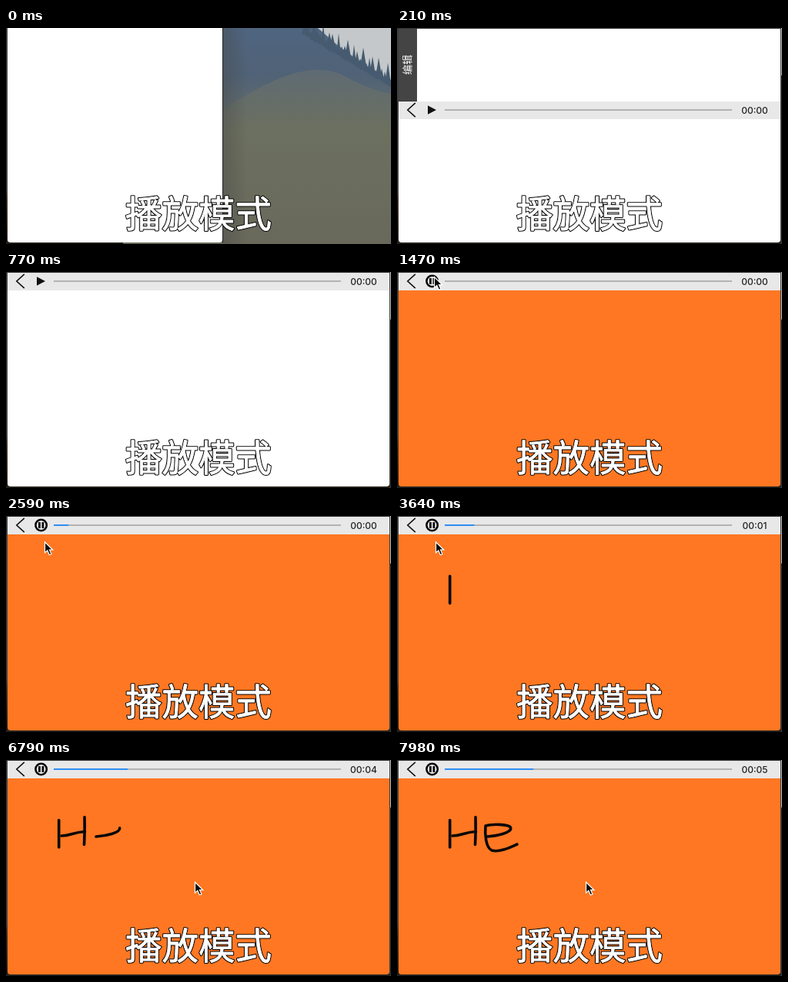
These frames come from a looping animation (500 by 282 pixels, 8 s). An HTML page:

```html
<!DOCTYPE html>
<html lang="zh">
<head>
<meta charset="utf-8">
<style>
  html, body { margin: 0; width: 100%; height: 100%; overflow: hidden; background: #292929; }
  svg { display: block; width: 100vw; height: 100vh; }
  .ink { fill: none; stroke: #080808; stroke-width: 3.6; stroke-linecap: round; stroke-linejoin: round; }
  .caption { font: 500 47.5px "Noto Sans CJK SC", "Noto Sans CJK", sans-serif; text-anchor: middle; stroke-linejoin: round; }
  .clock { font: 500 12px Inter, sans-serif; text-anchor: middle; fill: #222; }
  .tab { font: 13px "Noto Sans CJK SC", "Noto Sans CJK", sans-serif; text-anchor: middle; fill: #fff; }
</style>
</head>
<body>
<svg viewBox="0 0 500 282">
  <defs>
    <linearGradient id="hill" x2="0" y2="1">
      <stop offset="0" stop-color="#4f6580"/>
      <stop offset=".22" stop-color="#506276"/>
      <stop offset=".4" stop-color="#636d6d"/>
      <stop offset=".55" stop-color="#6c705f"/>
      <stop offset="1" stop-color="#69695b"/>
    </linearGradient>
    <linearGradient id="meadow" x2="0" y2="1">
      <stop offset="0" stop-color="#5e6b73"/>
      <stop offset=".35" stop-color="#6c705f"/>
      <stop offset="1" stop-color="#69695b"/>
    </linearGradient>
    <linearGradient id="shade">
      <stop offset="0" stop-color="#444" stop-opacity=".4"/>
      <stop offset="1" stop-color="#444" stop-opacity="0"/>
    </linearGradient>
    <linearGradient id="edge" x2="0" y2="1">
      <stop offset=".76" stop-color="#3c3c3c"/>
      <stop offset=".79" stop-color="#3b2a22"/>
      <stop offset="1" stop-color="#17130f"/>
    </linearGradient>
    <clipPath id="window"><rect id="mask" x="2" y="-10" height="290" rx="4"/></clipPath>
  </defs>

  <g id="photo">
    <rect width="500" height="282" fill="#c4c8ca"/>
    <path d="M0 0H405L430 22 460 44 480 57 500 70V282H0Z" fill="url(#hill)"/>
    <path id="trees" fill="#465b70"/>
    <path d="M280 108Q315 84 350 68Q405 44 440 63T500 86V282H280Z" fill="url(#meadow)"/>
    <g id="shadow">
      <rect width="32" height="282" fill="url(#shade)"/>
      <rect width="1" height="280" fill="#222"/>
    </g>
  </g>
  <rect width="2" height="282" fill="url(#edge)"/>
  <rect y="279" width="152" height="3" fill="#211d18"/>
  <g id="frame">
    <rect y="279" width="500" height="3" fill="#24211d"/>
    <rect x="498" width="2" height="282" fill="#303030"/>
    <rect x="499" width="1" height="62" fill="#c0c4c6"/>
  </g>

  <g clip-path="url(#window)">
    <rect id="page" width="500" height="282"/>
    <g class="ink" id="ink">
      <path d="M68.7 78.5V114"/>
      <path d="M72 99C84 99 88 94 102.5 93.5"/>
      <path d="M102 74.5Q102.5 94 101.5 110.5"/>
      <path d="M117 100C130 99 150 95 147.500 88C145 84 124 83 115 86C114 96 115 114 123 118C133 121 147 114 156 110"/>
    </g>
    <g id="panel">
      <rect x="2" y="-96" width="24" height="97" fill="#444"/>
      <text class="tab" transform="translate(18 -47) rotate(-90)">编辑</text>
      <rect y="1" width="500" height="23" fill="#e8e8e8"/>
      <path d="M23.800 2.800L13.800 12 23.800 21.200" fill="none" stroke="#111" stroke-width="1.6"/>
      <path id="play" d="M40 6.300L51 12 40 17.700Z" fill="#111"/>
      <g id="pause" fill="#080808">
        <circle cx="45.600" cy="12" r="7.200" fill="#f0f0f0" stroke="#080808" stroke-width="2.600"/>
        <path d="M42 8h2.800v8h-2.800zM46.500 8h2.800v8h-2.800z"/>
      </g>
      <path d="M62 12H435" stroke="#b2b2b2" stroke-width="2"/>
      <path id="progress" stroke="#2f8df5" stroke-width="2"/>
      <text class="clock" id="clock" x="464.500" y="16.500"></text>
    </g>
  </g>
  <path id="topline" d="M0 .5H499" stroke="#333"/>

  <g class="caption">
    <text x="250" y="259.500" fill="#000" stroke="#000" stroke-width="2.800">播放模式</text>
    <text x="250" y="259.500" fill="#fff" stroke="#fff" stroke-width=".8">播放模式</text>
  </g>
  <path id="cursor" d="M0 0V14L3.300 11 5.800 16.800 8.400 15.700 6 10.200H10.300Z" fill="#080808" stroke="#fff" stroke-width="1.200"/>
</svg>
<script>
const LOOP = 8000, STEP = 70, OPENED = 210, STARTED = 840;
const $ = id => document.getElementById(id);
const unit = (t, from, to) => Math.min(1, Math.max(0, (t - from) / (to - from)));
const smooth = u => (1 - Math.cos(Math.PI * u)) / 2;
const show = (id, on) => $(id).style.display = on ? '' : 'none';

// time, x, y
const cursorPath = [
  [840, 466, 262], [1400, 48.5, 6.5], [1750, 48.5, 6.5], [2380, 50.5, 34], [3640, 50.5, 34],
  [3920, 150, 126], [4200, 156, 132], [4340, 161, 136], [4760, 161, 136], [4970, 245.5, 159.5]
];
const strokeTimes = [[2870, 3500], [4690, 4970], [5670, 6020], [6440, 7840]];
const ticks = [1750, 2770, 3710, 4690, 5670, 6860];
const tickWidth = 19.2;

const strokes = [...$('ink').children];
strokes.forEach(path => path.setAttribute('pathLength', 1));

let trees = '';
for (let i = 0; i < 30; i++) {
  const x = 388 + i * 4, base = (x - 400) * .6 + 16;
  const height = 19 + 10 * Math.sin(i * 2.4), half = 4 + Math.sin(i * 5);
  trees += `M${x} ${base - height}l${half} ${height}h${-2 * half}Z`;
}
$('trees').setAttribute('d', trees);

function cursorAt(t) {
  const next = cursorPath.findIndex(point => point[0] > t);
  if (next < 0) return cursorPath.at(-1).slice(1);
  if (next === 0) return cursorPath[0].slice(1);
  const [a, b] = [cursorPath[next - 1], cursorPath[next]];
  const u = smooth(unit(t, a[0], b[0]));
  return [a[1] + (b[1] - a[1]) * u, a[2] + (b[2] - a[2]) * u];
}

function draw(t) {
  const width = 279 + 217 * smooth(unit(t, 0, OPENED));
  const opened = t >= OPENED, started = t >= STARTED;
  $('mask').setAttribute('width', width);
  $('shadow').setAttribute('transform', `translate(${width + 2} 0)`);
  show('photo', !opened);
  show('frame', opened);
  show('topline', opened);
  show('panel', opened);
  show('play', !started);
  show('pause', started);
  show('cursor', started);
  $('page').setAttribute('fill', started ? '#ff7722' : '#fff');

  const drop = 95 * (1 - smooth(unit(t, 230, 600)));
  $('panel').setAttribute('transform', `translate(0 ${drop})`);

  const filled = ticks.reduce((sum, at) => sum + smooth(unit(t, at, at + 280)), 0);
  $('progress').setAttribute('d', `M62 12h${filled * tickWidth}`);
  const seconds = Math.max(0, ticks.filter(at => t > at).length - 1);
  $('clock').textContent = `00:0${seconds}`;

  strokes.forEach((path, i) => {
    const u = unit(t, ...strokeTimes[i]);
    path.style.display = u ? '' : 'none';
    path.setAttribute('stroke-dasharray', `${u} 2`);
  });
  $('cursor').setAttribute('transform', `translate(${cursorAt(t)})`);
}

const start = performance.now();
function tick() {
  const t = (performance.now() - start) % LOOP;
  draw(Math.floor(t / STEP) * STEP);
  requestAnimationFrame(tick);
}
tick();
</script>
</body>
</html>
```
